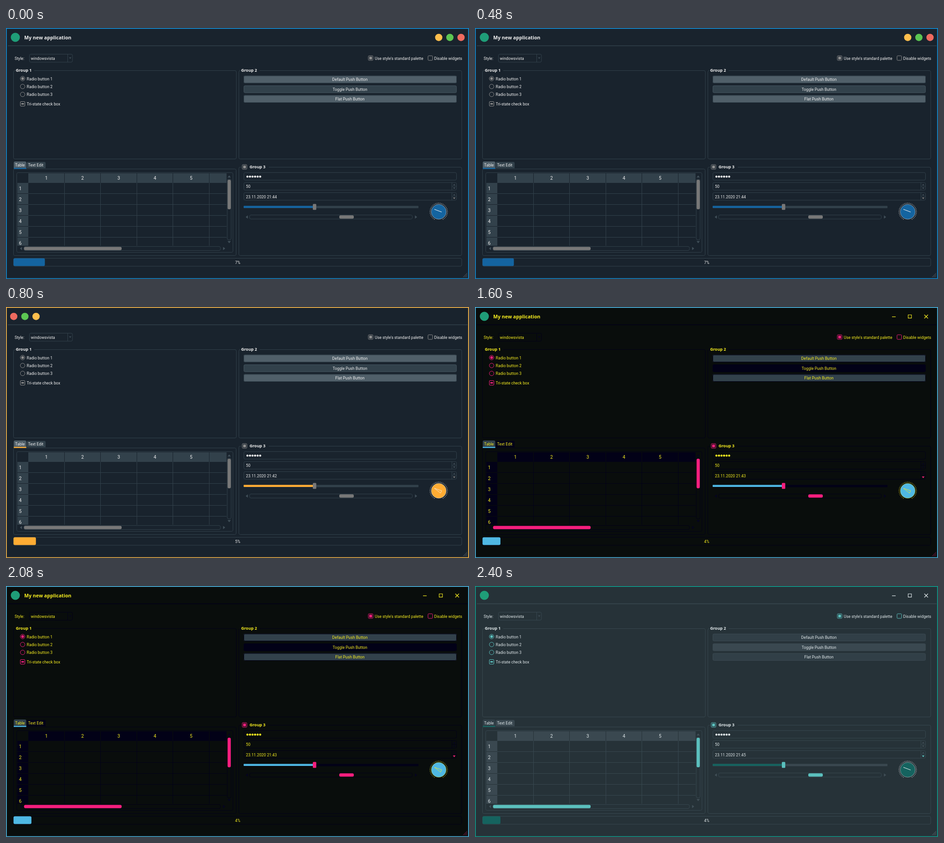
These frames come from a looping animation (1017x551 px, 3200 ms). An HTML page with a canvas:

```html
<!DOCTYPE html>
<html lang="en">
<head>
<meta charset="utf-8">
<title>Widget themes</title>
<style>
html, body { margin: 0; width: 100%; height: 100%; overflow: hidden; background: #19232d; }
canvas { display: block; }
</style>
</head>
<body>
<canvas id="stage" width="1017" height="551"></canvas>
<script>
const ctx = document.getElementById('stage').getContext('2d');
const HOLD = 800;
const dark = {
  bg: '#19232d', line: '#32414b', normal: '#32414b', light: '#505f69', arrow: '#414f59',
  text: '#f0f0f0', mark: '#8e8e8e', handle: '#787878', grip: '#59636b'
};
const themes = [
  { ...dark, frame: '#148cd2', accent: '#1464a0', title: true, icon: true, dots: 'right', progress: 7, time: '21:44', needle: 'line' },
  { ...dark, frame: '#f9b84b', accent: '#ffac33', dots: 'left', progress: 5, time: '21:42' },
  { bg: '#090d0c', line: '#020117', normal: '#020117', light: '#32414b', arrow: '#050420',
    text: '#f7ee20', mark: '#f51f7d', handle: '#f51f7d', grip: '#8d1c4c',
    frame: '#4fb8e3', accent: '#4fb8e3', title: true, icon: true, progress: 4, time: '21:43' },
  { bg: '#263238', line: '#37474f', normal: '#3a4850', light: '#313f47', arrow: '#414f57',
    text: '#e0e8ea', mark: '#5bc0be', handle: '#5bc0be', grip: '#5a6a70',
    frame: '#129a8b', accent: '#15635f', icon: true, progress: 4, time: '21:45', needle: 'line' }
];
let t;

function fill(x, y, w, h, color, r = 0) {
  ctx.fillStyle = color;
  ctx.beginPath();
  ctx.roundRect(x, y, w, h, r);
  ctx.fill();
}

function box(x, y, w, h, color = t.line, r = 3, width = 1) {
  ctx.strokeStyle = color;
  ctx.lineWidth = width;
  ctx.beginPath();
  ctx.roundRect(x, y, w, h, r);
  ctx.stroke();
}

function line(x1, y1, x2, y2, color = t.line, width = 1) {
  ctx.strokeStyle = color;
  ctx.lineWidth = width;
  ctx.beginPath();
  ctx.moveTo(x1, y1);
  ctx.lineTo(x2, y2);
  ctx.stroke();
}

function disc(x, y, r, color) {
  ctx.fillStyle = color;
  ctx.beginPath();
  ctx.arc(x, y, r, 0, Math.PI * 2);
  ctx.fill();
}

function ring(x, y, r, color, width = 1) {
  ctx.strokeStyle = color;
  ctx.lineWidth = width;
  ctx.beginPath();
  ctx.arc(x, y, r, 0, Math.PI * 2);
  ctx.stroke();
}

function label(text, x, y, align = 'left', font = '8.75px Roboto, sans-serif') {
  ctx.font = font;
  ctx.textAlign = align;
  ctx.fillStyle = t.text;
  ctx.fillText(text, x, y);
}

const bold = (text, x, y, size = 8.95) =>
  label(text, x, y, 'left', `bold ${size}px "Noto Sans", sans-serif`);

// Small triangle; quarter turns clockwise from "up"
function arrow(x, y, turns, color = t.arrow, size = 3) {
  ctx.save();
  ctx.translate(x, y);
  ctx.rotate(turns * Math.PI / 2);
  ctx.fillStyle = color;
  ctx.beginPath();
  ctx.moveTo(-size, size * .6);
  ctx.lineTo(0, -size * .7);
  ctx.lineTo(size, size * .6);
  ctx.fill();
  ctx.restore();
}

function checkBox(x, y, state) {
  box(x + .5, y + .5, 10, 10, t.mark, 1.5);
  if (state === 'on') fill(x + 2.5, y + 2.5, 6, 6, t.mark);
  if (state === 'partial') fill(x + 2.7, y + 4, 5.8, 3, t.mark);
}

function group(title, x, y, titleX, gapEnd) {
  box(x, y, 489.5, 194);
  fill(x + 5, y - 2, gapEnd - x - 5, 4, t.bg);
  bold(title, titleX, y + 2.3);
}

function windowBar() {
  box(.8, .8, 1015.2, 549.2, t.frame, 0, 1.7);
  line(4, 39, 1014, 39, t.line, 1.6);
  if (t.icon) disc(20.5, 20.5, 10, '#1f9d78');
  if (t.title) bold('My new application', 40, 25, 10.65);
  if (t.dots) {
    const colors = ['#fdbe4c', '#5cc552', '#ee6a5f'];
    if (t.dots === 'left') colors.reverse();
    const start = t.dots === 'left' ? 17 : 950.5;
    colors.forEach((color, i) => disc(start + 24.5 * i, 20.7, 8, color));
  } else {
    line(916, 21.5, 924, 21.5, t.text, 1.2);
    box(951.5, 17.2, 7.2, 7.2, t.text, 0, 1.1);
    line(987, 17, 995, 25, t.text, 1.2);
    line(995, 17, 987, 25, t.text, 1.2);
  }
}

function topRow() {
  label('Style:', 19, 70);
  box(51.5, 57.5, 94.5, 17.5);
  line(135.5, 58, 135.5, 75);
  label('windowsvista', 54.5, 70);
  arrow(141, 66, 2, t.arrow, 2.6);
  checkBox(795.5, 60.5, 'on');
  label("Use style's standard palette", 810, 70);
  checkBox(926.5, 60.5);
  label('Disable widgets', 940.5, 70);
}

function groups() {
  group('Group 1', 16.5, 93.5, 21.5, 62);
  for (let i = 0; i < 3; i++) {
    const y = 111 + 17.4 * i;
    ring(36.5, y, 5, t.mark);
    if (!i) disc(36.5, y, 3, t.mark);
    label('Radio button ' + (i + 1), 45.5, y + 3.6);
  }
  checkBox(31, 161, 'partial');
  label('Tri-state check box', 45.5, 170.2);

  group('Group 2', 511.5, 93.5, 516.5, 557);
  ['Default', 'Toggle', 'Flat'].forEach((name, i) => {
    const y = 104.8 + 21.4 * i;
    fill(522, y, 468, 16.2, i === 1 ? t.normal : t.light, 3);
    box(522.5, y + .5, 467, 15.4, i === 1 && t.bg === dark.bg ? '#43525c' : t.normal);
    label(name + ' Push Button', 755.5, y + 11.6, 'center');
  });
}

function scrollBar(x, y, w, h, from, length, vertical) {
  box(x, y, w, h);
  if (vertical) {
    fill(x + .7, from, w - 1.4, length, t.handle, 3);
    arrow(x + w / 2, y - 5.5, 0, t.arrow, 3.6);
    arrow(x + w / 2, y + h + 5, 2, t.arrow, 3.6);
  } else {
    fill(from, y + .7, length, h - 1.4, t.handle, 3);
    arrow(x - 6, y + h / 2, 3, t.arrow, 3.6);
    arrow(x + w + 8, y + h / 2, 1, t.arrow, 3.6);
  }
}

function tablePane() {
  box(16.5, 309.5, 489, 190);
  fill(17, 293, 27.5, 16, t.light, [3, 3, 0, 0]);
  fill(17, 307, 27.5, 2.4, t.accent);
  fill(45.5, 294, 41.5, 14, t.normal, [3, 3, 0, 0]);
  label('Table', 20, 304);
  label('Text Edit', 48.5, 304.3);

  box(23.5, 317.5, 475, 175);
  ctx.save();
  ctx.beginPath();
  ctx.rect(25, 319, 459.5, 159);
  ctx.clip();
  fill(49, 319, 436, 21, t.normal);
  fill(25, 340, 24, 138, t.normal);
  const font = '10.3px Roboto, sans-serif';
  for (let i = 0; i < 6; i++) {
    const x = 49 + 79.5 * i, y = 340 + 23.9 * i;
    const right = Math.round(x + 79.5) - .5, bottom = Math.round(y + 23.9) - .5;
    line(right, 340, right, 478);
    line(right, 319, right, 340, t.bg);
    line(49, bottom, 485, bottom);
    line(25, bottom, 49, bottom, t.bg);
    if (i < 5) label(i + 1, x + 39.7, 333.3, 'center', font);
    label(i + 1, 28.5, y + 16.4, 'left', font);
  }
  ctx.restore();
  scrollBar(486, 331.5, 8.5, 133.5, 333, 65, true);
  scrollBar(39, 479.7, 432, 8.8, 39.6, 214.4);
}

function spinner(y, value, lower) {
  box(522.5, y, 467, 16.7);
  line(979.5, y, 979.5, y + 16.7);
  line(979.5, y + 8.4, 989.5, y + 8.4);
  label(value, 527, y + 12.2);
  arrow(984.5, y + 4.7, 0, t.arrow, 2.6);
  arrow(984.5, y + 12.4, 2, lower, 2.8);
}

function dial() {
  const x = 950.5, y = 403.5;
  for (let i = 0; i <= 30; i++) {
    const a = (120 + 10 * i) * Math.PI / 180, c = Math.cos(a), s = Math.sin(a);
    line(x + 17.8 * c, y + 17.8 * s, x + 20 * c, y + 20 * s, t.text, .8);
  }
  disc(x, y, 16.3, t.accent);
  ring(x, y, 16.3, t.text, .5);
  if (t.needle === 'line') return line(941, 398, 957, 404, t.text, 1.1);
  ctx.strokeStyle = t.text;
  ctx.lineWidth = .8;
  ctx.beginPath();
  ctx.moveTo(941, 398);
  ctx.lineTo(957, 403.3);
  ctx.lineTo(954.5, 408.5);
  ctx.closePath();
  ctx.stroke();
}

function inputs() {
  group('Group 3', 511.5, 305.5, 535, 577);
  checkBox(518.5, 299.5, 'on');
  box(522.5, 317.3, 467, 16.7);
  for (let i = 0; i < 6; i++) disc(530.3 + 5.6 * i, 326.2, 2.3, t.text);
  spinner(339.2, '50', t.arrow);
  spinner(361.3, '23.11.2020 ' + t.time, t.handle);
  fill(522, 390.5, 384, 5, t.normal, 1);
  fill(522, 390.5, 155, 4.6, t.accent, 1);
  fill(674, 386.3, 7.5, 13, t.handle, 1.5);
  scrollBar(535, 410.5, 357.5, 8.8, 732, 32);
  dial();
}

function footer() {
  box(16.5, 505.5, 984.5, 17.5);
  fill(16.5, 505.5, 984 * t.progress / 100, 17, t.accent, 3);
  label(t.progress + '%', 509, 517.5, 'center');
  for (let i = 1; i < 4; i++) line(1013 - 3 * i, 547, 1013, 547 - 3 * i, t.grip, .9);
}

function draw(now) {
  t = themes[Math.floor(now / HOLD) % themes.length];
  fill(0, 0, 1017, 551, t.bg);
  windowBar();
  topRow();
  groups();
  tablePane();
  inputs();
  footer();
}

const start = performance.now();
function tick() {
  draw(performance.now() - start);
  requestAnimationFrame(tick);
}
tick();
</script>
</body>
</html>
```
